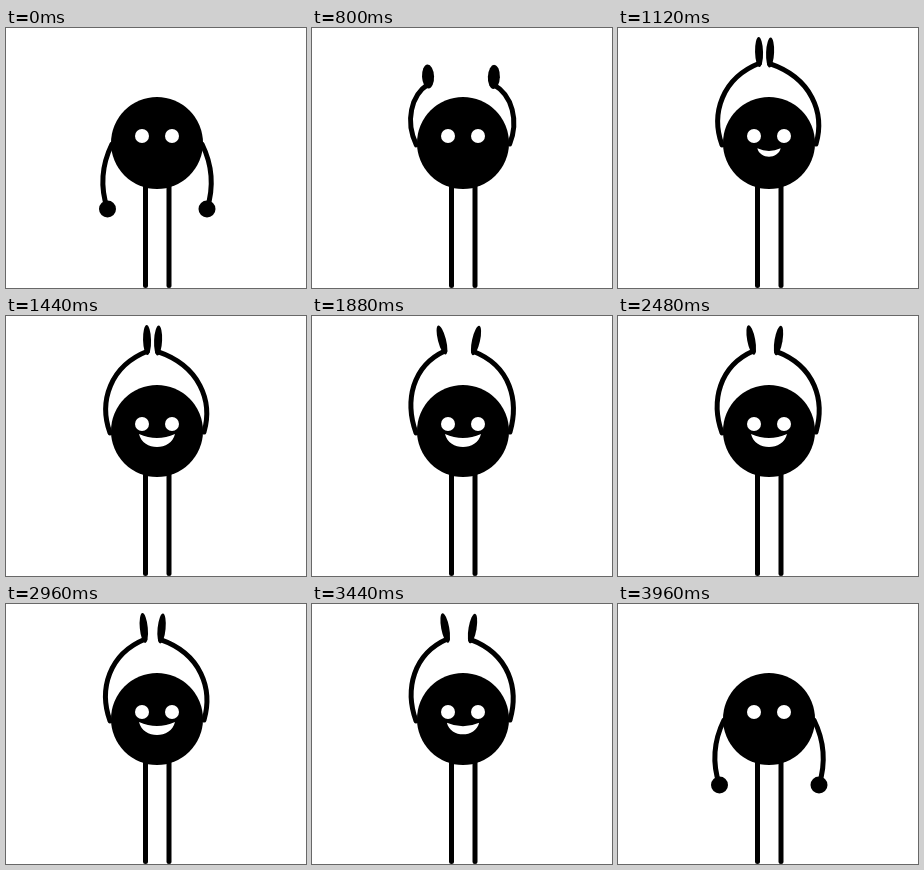
These frames come from a looping animation (300 by 260 pixels, 5.52 s). An HTML page with a canvas:

```html
<!DOCTYPE html>
<html lang="en">
<head>
<meta charset="utf-8">
<title>Clapping figure</title>
<style>
  html, body { margin: 0; width: 100%; height: 100%; overflow: hidden; background: #fff; }
  canvas { display: block; }
</style>
</head>
<body>
<canvas id="stage" width="300" height="260"></canvas>
<script>
const ctx = document.getElementById('stage').getContext('2d');
const LOOP = 5520;
const CLAP_START = 940, CLAP_END = 3500, CLAP_PERIOD = 320;

// Each point pair is [arms down, arms raised]; raised x of hand and elbow is [open, closed].
const ARMS = [
  { shoulder: [[106, 116], [104, 117]], upper: [[95.7, 137], [92.5, 85]],
    lower: [94, 159], lowerX: [100, 104.5],
    rest: [101.5, 181], swingX: 81, handX: [129.5, 141.5], handY: 24, tilt: [-15, -1] },
  { shoulder: [[196, 116], [198, 116]], upper: [[206.3, 137], [207, 85]],
    lower: [208, 159], lowerX: [199, 193.5],
    rest: [201, 181], swingX: 227, handX: [164.5, 151.6], handY: 24.5, tilt: [13, 2] }
];

const mix = (a, b, k) => a + (b - a) * k;
const mixPoint = (a, b, k) => [mix(a[0], b[0], k), mix(a[1], b[1], k)];
const ease = (t, from, to) => {
  const u = Math.min(1, Math.max(0, (t - from) / (to - from)));
  return u * u * (3 - 2 * u);
};
const bow = (a, c, b, k) => mix(mix(a, c, k), mix(c, b, k), k);

function line(x1, y1, x2, y2) {
  ctx.beginPath();
  ctx.moveTo(x1, y1);
  ctx.lineTo(x2, y2);
  ctx.stroke();
}

function ellipse(x, y, rx, ry = rx, angle = 0) {
  ctx.beginPath();
  ctx.ellipse(x, y, rx, ry, angle, 0, 2 * Math.PI);
  ctx.fill();
}

function drawArm(arm, raise, clap) {
  const x = bow(arm.rest[0], arm.swingX, mix(...arm.handX, clap), raise);
  const y = mix(arm.rest[1], arm.handY, raise);
  const stretch = raise ** 3.5;
  const rx = mix(8.5, 4, stretch), ry = mix(8.5, 15, stretch);
  const angle = mix(...arm.tilt, clap) * raise ** 10 * Math.PI / 180;
  const wrist = ry * 0.75 * raise;

  ctx.beginPath();
  ctx.moveTo(...mixPoint(...arm.shoulder, raise));
  ctx.bezierCurveTo(
    ...mixPoint(...arm.upper, raise),
    ...mixPoint(arm.lower, [mix(...arm.lowerX, clap), 50], raise),
    x - Math.sin(angle) * wrist, y + Math.cos(angle) * wrist);
  ctx.stroke();
  ellipse(x, y, rx, ry, angle);
}

function drawMouth(size) {
  if (size <= 0) return;
  ctx.save();
  ctx.translate(151, 124.5);
  ctx.scale(size, size);
  ctx.beginPath();
  ctx.moveTo(-18, -6.5);
  ctx.quadraticCurveTo(0, 1.5, 18, -6.5);
  ctx.bezierCurveTo(14, 10.8, -14, 10.8, -18, -6.5);
  ctx.fill();
  ctx.restore();
}

function draw(t) {
  const raise = ease(t, 440, 920) - ease(t, 3620, 3960);
  const smile = ease(t, 1000, 1200) - ease(t, 3400, 3600);
  const clapping = t > CLAP_START && t < CLAP_END;
  const clap = clapping
    ? (1 - Math.cos((t - CLAP_START) / CLAP_PERIOD * 2 * Math.PI)) / 2 : 0;

  ctx.fillStyle = '#fff';
  ctx.fillRect(0, 0, 300, 260);
  ctx.fillStyle = ctx.strokeStyle = '#000';
  ctx.lineWidth = 5;
  ctx.lineCap = 'round';

  line(139.5, 150, 139.5, 257.5);
  line(163, 150, 163, 257.5);
  for (const arm of ARMS) drawArm(arm, raise, clap);
  ellipse(151, 115, 46);

  ctx.fillStyle = '#fff';
  ellipse(136, 108, 7);
  ellipse(166, 108, 7);
  drawMouth(smile);
}

const start = performance.now();
function frame() {
  // The picture advances in steps of 40 ms.
  const t = (performance.now() - start) % LOOP;
  draw(Math.floor(t / 40) * 40);
  requestAnimationFrame(frame);
}
frame();
</script>
</body>
</html>
```
